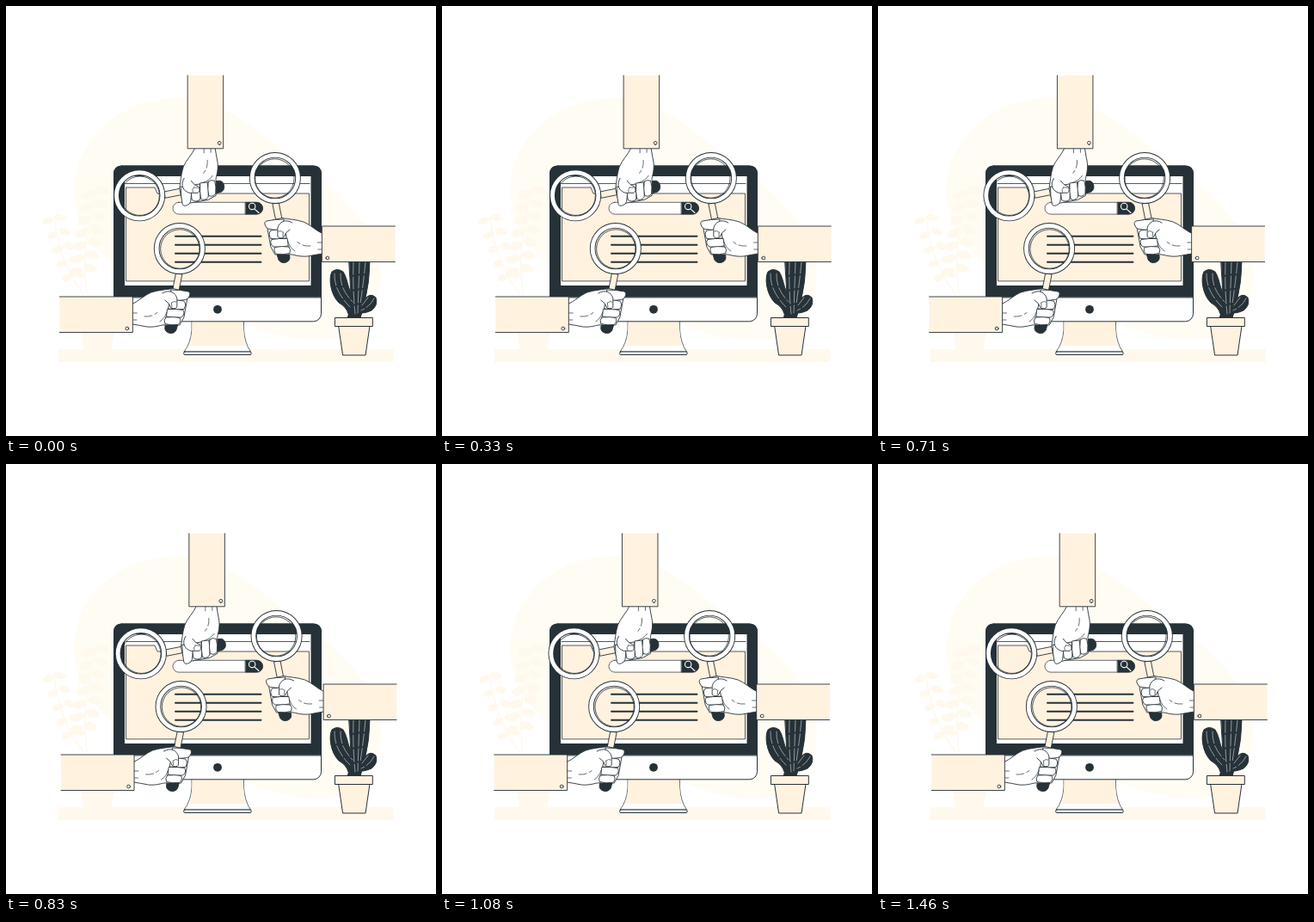
Recreate the animation shown at these times as an HTML page. Size 500 px wide and 500 px high, loop 1500 ms.

```html
<!DOCTYPE html>
<html lang="en">
<head>
<meta charset="utf-8">
<style>
  html, body { margin: 0; width: 100%; height: 100%; overflow: hidden; background: #fff; }
  svg { display: block; width: 100vw; height: 100vh; }
  .ink { stroke: #263238; stroke-linecap: round; stroke-linejoin: round; }
  .line { fill: none; }
  .white { fill: #fff; }
  .cream { fill: #fff2df; }
  .dark { fill: #263238; }
</style>
</head>
<body>
<svg viewBox="0 0 500 500">
  <defs>
    <path id="leaf" d="M-7 0Q-5 -5 1 -4Q6 -3 7 0Q4 4 -1 4Q-6 4 -7 0Z"/>
    <g id="arm" class="ink" stroke-width=".9">
      <path class="cream" d="M198 311L205 312 199 342 192 341Z"/>
      <path class="dark" d="M186 368L200 370 198 377Q195 382 189 380 184 378 185 373Z"/>
      <path class="white" d="M147 346.500C155 343 161 336 169 333C178 330 187 330 194 328.500L205 331 211 340 207 362 202 371 186 371C181 370 176 374 164 373Q154 371 147 370Z"/>
      <path class="white" d="M192 330Q203 330 212 332Q215 333 213.500 337Q212 341 209 341.500L195 343Z"/>
      <path class="white" d="M191 342.500Q200 341.500 207 343Q210.500 347 207 352.500Q198 354 189 352Z"/>
      <path class="white" d="M188 352.500Q198 352 206 353.500Q209 358 204 362Q196 363 187 361Z"/>
      <path class="white" d="M186 362Q195 361 202 362.500Q204.500 367 200 370.500Q192 371.500 185 369.500Q183 365 186 362Z"/>
      <path class="white" d="M182 334C190 329 197 333 199 340L199 350Q197 353 192 351Q190 345 185 342"/>
      <path class="line" stroke-width=".7" d="M193 345Q195 342.500 198 344M192.500 345L193 350M161 361Q166 361.500 170 360M173 358.500L176 356.500M179 367Q185 363 187 356M147 357H152.500M148 365H152"/>
      <path class="cream" stroke="none" d="M62.500 338H147.500V379.500H62.500Z"/>
      <path class="line" d="M62.500 338H147.500V379.500H62.500"/>
      <circle class="white" cx="141" cy="375" r="1.900"/>
      <g class="line">
        <circle cx="202" cy="282" r="26.700" stroke-width="6.600"/>
        <circle cx="202" cy="282" r="26.700" stroke-width="4.800" style="stroke:#fff"/>
        <circle cx="202.500" cy="282.500" r="22.700" stroke-width=".8"/>
      </g>
    </g>
  </defs>

  <path fill="#fffcf4" d="M200 107C250 106 288 142 326 172C375 206 425 245 435 300C440 350 420 388 365 388C315 388 290 374 265 362C180 345 82 300 79 215C82 150 135 107 200 107Z"/>
  <g fill="#fff8ed">
    <path d="M61 399H451V414H61ZM87 378H126L122 402H91Z"/>
    <path fill="none" stroke="#fff8ed" stroke-width="1.500" d="M56 245C60 285 73 313 91 336M107 210C96 245 88 290 94 336"/>
    <g id="leaves"></g>
  </g>

  <g class="ink">
    <path class="white" stroke-width=".7" d="M216 366V376Q215 392 207 402H284.500Q277.500 392 276.500 376V366Z"/>
    <path class="cream" stroke="none" d="M216.500 367H276Q276 386 279 395H213.500Q216.500 386 216.500 367Z"/>
    <rect class="white" x="206.800" y="402" width="78.200" height="3.500" rx="1"/>
    <rect class="white" x="125.500" y="186" width="241" height="180.800" rx="9"/>
    <path class="dark" d="M125.500 338.500V195Q125.500 186 134.500 186H357.500Q366.500 186 366.500 195V338.500Z"/>
    <rect class="white" stroke="none" x="138" y="198" width="216.500" height="127"/>
    <path class="line" stroke-width=".8" d="M139 206.500H353"/>
    <path class="cream" stroke-width=".8" d="M139.500 319.500V211H173L176 218H352.500V319.500Z"/>
    <rect class="white" stroke-width=".7" x="194" y="228.300" width="104.500" height="13.800" rx="6.900"/>
    <path class="dark" stroke-width=".7" d="M278.500 228.300H291.600A6.900 6.900 0 0 1 291.600 242.100H278.500Z"/>
    <path class="line" style="stroke:#fff" stroke-width="1.100" d="M288.800 235.800L294 240.500M289.900 232.900A3.700 3.700 0 1 1 282.500 232.900A3.700 3.700 0 1 1 289.900 232.900"/>
    <path class="line" stroke-width="1.900" d="M197 267.800H296.500M197 277.800H296.500M197 287.800H296.500M197 297.800H296.500"/>
    <circle class="dark" stroke="none" cx="246" cy="352.800" r="4.900"/>
  </g>

  <g class="ink">
    <path class="dark" d="M399 296H423Q423 320 417 345L412 363H397Q402 350 401 335Z"/>
    <path class="dark" d="M398 358Q396 350 387 345C377 335 375 316 379 309Q385 304 392 309C398 318 397 330 404 337L410 350Z"/>
    <path class="dark" d="M407 355Q415 347 418 340Q424 333 430 339Q433 348 425 354Q416 358 410 357Z"/>
    <path class="line" style="stroke:#fff" stroke-width=".5" stroke-dasharray="14 3" d="M404 298Q403 330 406 358M411 297L409 357M418 297Q416 320 412 346M382 311Q381 331 400 350M389 311Q388 329 403 344M428 340Q424 349 413 354M421 339L414 348"/>
    <path class="cream" d="M387 372H423L418 406H392Z"/>
    <rect class="cream" x="382.800" y="362.500" width="43.500" height="10"/>
  </g>

  <g id="arms">
    <use href="#arm"/>
    <use href="#arm" transform="matrix(-1 0 0 1 515 -82)"/>
    <use href="#arm" transform="matrix(0 1 1 0 -126.700 18.300)"/>
  </g>
</svg>
<script>
  const LOOP = 1500, FPS = 24;
  // Horizontal offset at every tenth of the loop.
  const SHAKE = [0, -1, 2, -4, 4, -4, 4, -4, 2, -1, 0];
  const arms = document.getElementById('arms');

  function addLeaves(count, x, y, dx, dy, size) {
    let html = '';
    for (let i = 0; i < count; i++)
      for (const side of [-1, 1]) {
        const px = x + dx * i + side * 7 * size, py = y + dy * i - side * 2;
        html += `<use href="#leaf" transform="translate(${px} ${py}) rotate(${side * 18}) scale(${size})"/>`;
      }
    document.getElementById('leaves').innerHTML += html;
  }
  addLeaves(5, 56, 248, 5.5, 16.5, 1);
  addLeaves(7, 105, 217, -2.5, 15, 1.2);

  function offsetAt(ms) {
    const tick = Math.floor((ms + 4) * FPS / 1000) + 0.5;
    const pos = (tick * 1000 / FPS % LOOP) / LOOP * 10;
    const i = Math.floor(pos);
    return SHAKE[i] + (SHAKE[i + 1] - SHAKE[i]) * (pos - i);
  }

  function draw() {
    arms.setAttribute('transform', `translate(${offsetAt(performance.now() % LOOP)} 0)`);
    requestAnimationFrame(draw);
  }
  draw();
</script>
</body>
</html>
```
